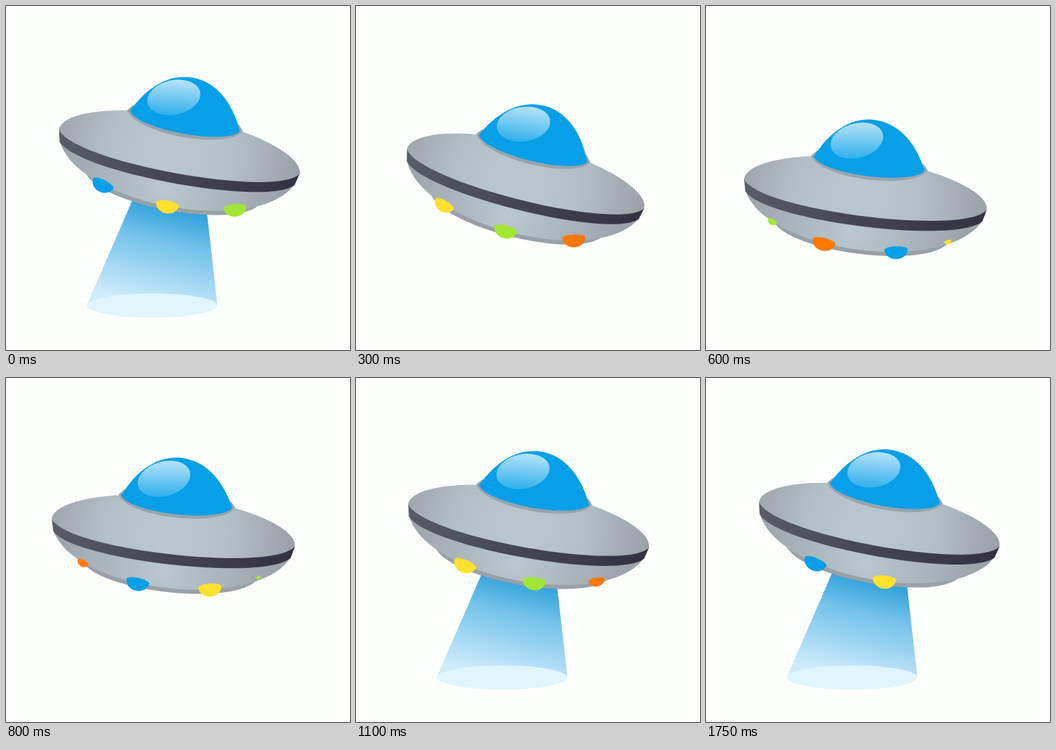
Recreate the animation shown at these times as an HTML page. Size 498x498 px, loop 1.8 s.

```html
<!DOCTYPE html>
<html lang="en">
<head>
<meta charset="utf-8">
<title>Flying saucer</title>
<style>
html, body { margin: 0; height: 100%; overflow: hidden; background: #fdfffc; }
svg { display: block; width: 100vw; height: 100vh; }
</style>
</head>
<body>
<svg viewBox="0 0 498 498">
  <defs>
    <linearGradient id="ray" gradientUnits="userSpaceOnUse" x1="245" y1="280" x2="208" y2="433">
      <stop offset="0" stop-color="#1f98d6"/>
      <stop offset=".4" stop-color="#74c2eb"/>
      <stop offset="1" stop-color="#cfecfa"/>
    </linearGradient>
    <radialGradient id="disc" gradientUnits="userSpaceOnUse" cx="-10" cy="5" r="180">
      <stop offset="0" stop-color="#bac8cf"/>
      <stop offset=".5" stop-color="#b4c0c7"/>
      <stop offset="1" stop-color="#9ca2a8"/>
    </radialGradient>
    <radialGradient id="belly" gradientUnits="userSpaceOnUse" cx="-10" cy="55" r="165">
      <stop offset="0" stop-color="#bac8cf"/>
      <stop offset="1" stop-color="#9ba3a9"/>
    </radialGradient>
    <linearGradient id="band">
      <stop offset="0" stop-color="#595d66"/>
      <stop offset=".4" stop-color="#484955"/>
      <stop offset="1" stop-color="#343140"/>
    </linearGradient>
    <linearGradient id="shine" x1=".8" y1="0" x2=".35" y2="1">
      <stop offset="0" stop-color="#fff" stop-opacity=".75"/>
      <stop offset="1" stop-color="#fff" stop-opacity=".16"/>
    </linearGradient>
  </defs>
  <g id="beam">
    <path fill="url(#ray)" d="M190 265H287L306 433H117Z"/>
    <ellipse cx="211.5" cy="433.5" rx="94.5" ry="17.5" fill="#e0f5fd"/>
  </g>
  <g id="ship">
    <path fill="#98a1a7" d="M-128 52C-100 95 100 95 128 52Z"/>
    <path fill="url(#belly)" d="M-173 14C-132 100 132 100 173 14Z"/>
    <path fill="url(#band)" d="M-177 -2L-173 15C-140 54 140 54 173 15L177 -2Z"/>
    <path fill="url(#disc)" d="M-177 -2C-150 40 150 40 177 -2C178 -28 100 -54 0 -54S-178 -28 -177 -2Z"/>
    <path fill="#99a4ab" d="M-85 -48C-68 -16 68 -16 85 -48L78 -56H-78Z"/>
    <path fill="#069fe8" d="M-81 -47C-60 -92 -30 -111 0 -111S60 -92 81 -47C64 -23 -64 -23 -81 -47Z"/>
    <ellipse rx="39" ry="25" transform="translate(-22 -78) rotate(-22)" fill="url(#shine)"/>
    <g id="lights"></g>
  </g>
</svg>
<script>
const LOOP = 1800, STEP = 50;
const colors = ['#ffe02f', '#a2e635', '#ff7900', '#069fe8'];
const $ = id => document.getElementById(id);

// time, x, y, tilt
const poses = [
  [0, 250.5, 213, 10.4], [300, 245, 252, 14], [520, 230, 278, 9],
  [600, 230.5, 275, 7.2], [800, 242, 226, 6.4], [1000, 250, 212.5, 9.4],
  [1100, 249.5, 216, 10.2], [1350, 250.3, 221, 10.3], [1500, 250.5, 219, 10.3],
  [1750, 250.5, 213.7, 10.4]
];

const lights = Array.from({ length: 8 }, (_, i) => {
  const p = document.createElementNS('http://www.w3.org/2000/svg', 'path');
  p.setAttribute('d', 'M-17 -6C-13 -12 13 -12 17 -6C15 13 -15 13 -17 -6Z');
  p.setAttribute('fill', colors[i % 4]);
  return $('lights').appendChild(p);
});

const clamp = v => Math.max(0, Math.min(1, v));

function key(i) {
  const n = poses.length, [t, ...rest] = poses[(i + n) % n];
  return [t + Math.floor(i / n) * LOOP, ...rest];
}

// Smooth curve through the poses without overshoot
function pose(t, c) {
  let i = 0;
  while (key(i + 1)[0] <= t) i++;
  const slope = j => (key(j + 1)[c] - key(j)[c]) / (key(j + 1)[0] - key(j)[0]);
  const tangent = j => {
    const a = slope(j - 1), b = slope(j);
    return a * b > 0 ? 2 * a * b / (a + b) : 0;
  };
  const a = key(i), b = key(i + 1), h = b[0] - a[0], s = (t - a[0]) / h, r = 1 - s;
  return a[c] * (1 + 2 * s) * r * r + b[c] * (3 - 2 * s) * s * s
    + h * s * r * (tangent(i) * r - tangent(i + 1) * s);
}

function draw() {
  const t = Math.floor(performance.now() % LOOP / STEP) * STEP;
  $('ship').setAttribute('transform',
    `translate(${pose(t, 1)} ${pose(t, 2)}) rotate(${pose(t, 3)})`);
  $('beam').setAttribute('opacity', t < 600 ? clamp((220 - t) / 180) : clamp((t - 870) / 180));

  const turn = t < 300 ? t * .16 : 48 + (t - 300) * .208;
  lights.forEach((light, i) => {
    const deg = (i * 45 - turn + 540) % 360 - 180, a = deg * Math.PI / 180;
    // No new light enters on the right just before the loop restarts
    const size = t > 1600 && deg > 45 ? 0 : clamp((82 - Math.abs(deg)) / 38);
    light.setAttribute('transform',
      `translate(${139 * Math.sin(a) - 3} ${36 + 45 * Math.cos(a)}) rotate(${-deg * .36}) scale(${size})`);
  });
  requestAnimationFrame(draw);
}
draw();
</script>
</body>
</html>
```
